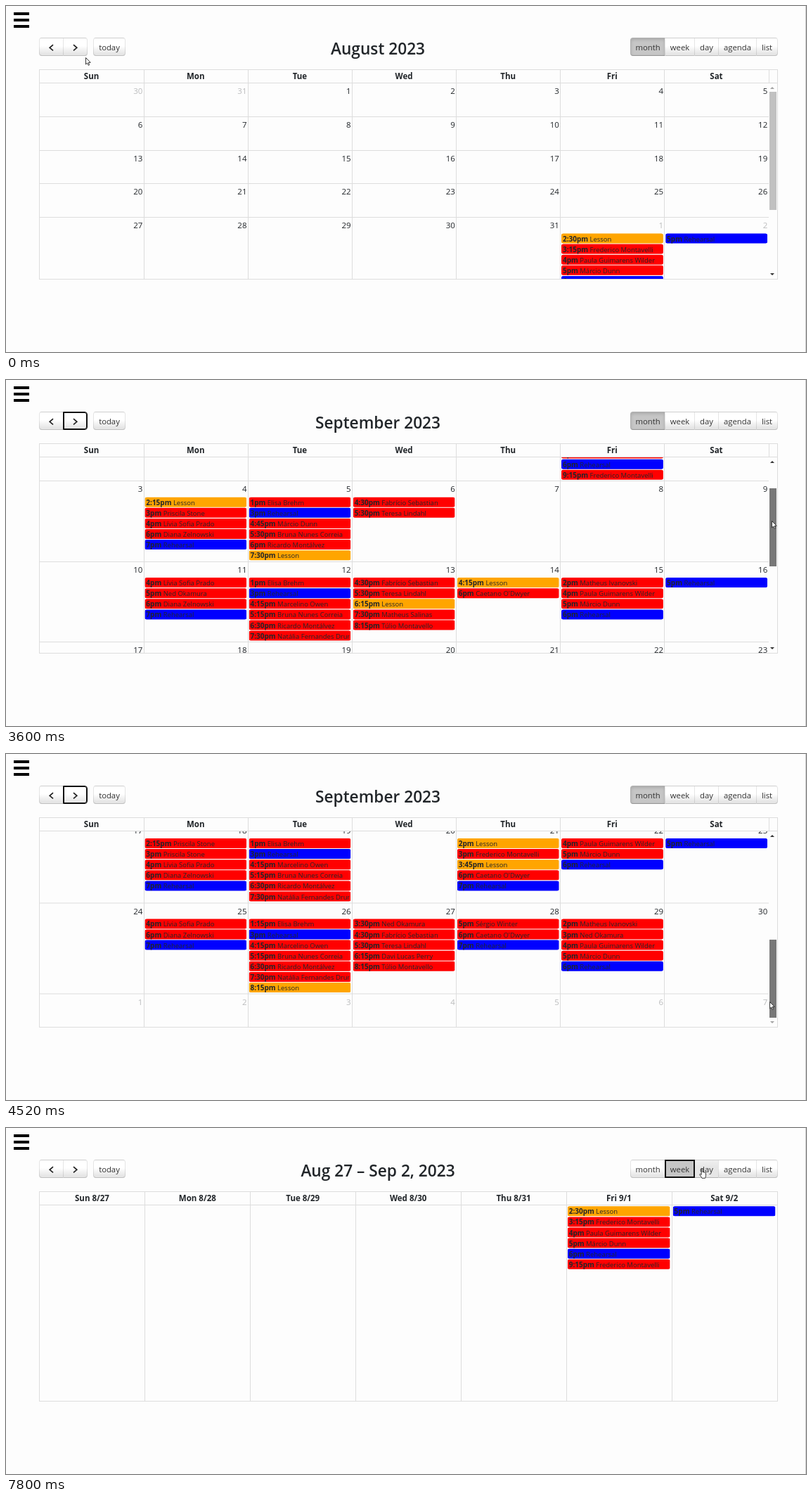
Recreate the animation shown at these times as an HTML page. Size 1138 px wide and 492 px high, loop 8000 ms.

```html
<!DOCTYPE html>
<html lang="en">
<head>
<meta charset="utf-8">
<title>Lesson calendar</title>
<style>
html, body { margin: 0; width: 100%; height: 100%; overflow: hidden; background: #fdfdfd; }
body { font: 11.5px "Open Sans", "Noto Sans", sans-serif; color: #212529; }
#stage { position: relative; width: 1138px; height: 492px; overflow: hidden; background: #fdfdfd; }
#stage div, #stage svg { position: absolute; box-sizing: border-box; white-space: nowrap; }
.bar { background: #000; }
.edge { background: #ccc; }
.line { background: #ddd; }
.frame { border: 1px solid #ddd; }
.title { font-size: 22.7px; font-weight: 600; text-align: center; line-height: 32px; }
.head { font-weight: 700; text-align: center; line-height: 18px; }
.num { text-align: right; line-height: 16px; }
.num.out { opacity: .3; }
.event { border: solid; border-width: 0 2px; border-radius: 2.5px; overflow: hidden;
  font-size: 9.5px; line-height: 15px; }
.event b { font-size: 10px; }
.event.lesson { background: orange; border-color: orange; }
.event.rehearsal { background: #00f; border-color: #00f; }
.event.pupil { background: #f00; border-color: #f00; }
.button { border: 1px solid rgba(0,0,0,.1); border-bottom-color: rgba(0,0,0,.25);
  background: #f5f5f5 linear-gradient(#fff 45%, #e6e6e6 90%);
  font-size: 11.3px; color: #333; text-align: center; line-height: 25px; }
.button.hover { background: linear-gradient(#efefef, #e6e6e6 40%); }
.button.down { background: #c6c6c6; box-shadow: inset 0 2px 4px rgba(0,0,0,.15); }
.button.focus { border-color: #101010; box-shadow: inset 0 0 0 1px #101010; border-radius: 3px; z-index: 1; }
.tip { border: solid transparent; border-width: 0 3px; }
.clip { overflow: hidden; }
</style>
</head>
<body>
<div id="stage"></div>
<script>
const stage = document.getElementById('stage');
const LOOP = 8000, LEFT = 47.5, TOP = 109, BOTTOM = 388;
const DAYS = ['Sun', 'Mon', 'Tue', 'Wed', 'Thu', 'Fri', 'Sat'];

const PEOPLE = {
  A: 'Frederico Montavelli', B: 'Paula Guimarens Wilder', C: 'Márcio Dunn', D: 'Diana Zelnowski',
  E: 'Ricardo Montálvez', F: 'Sérgio Winter', G: 'Priscila Stone', H: 'Fabrício Sebastian',
  I: 'Teresa Lindahl', J: 'Davi Lucas Perry', K: 'Elisa Brehm', L: 'Lesson', M: 'Lívia Sofia Prado',
  N: 'Natália Fernandes Drumond', O: 'Caetano O\'Dwyer', P: 'Matheus Ivanovski', R: 'Rehearsal',
  S: 'Ned Okamura', T: 'Túlio Montavello', U: 'Bruna Nunes Correia', V: 'Marcelino Owen',
  W: 'Matheus Salinas'
};

// September bookings by day: start time followed by a key of PEOPLE
const BOOKINGS = {
  1: '2:30L 3:15A 4B 5C 6R 9:15A', 2: '5R',
  4: '2:15L 3G 4M 6D 7R', 5: '1K 3R 4:45C 5:30U 6E 7:30L', 6: '4:30H 5:30I',
  11: '4M 5S 6D 7R', 12: '1K 3R 4:15V 5:15U 6:30E 7:30N', 13: '4:30H 5:30I 6:15L 7:30W 8:15T',
  14: '4:15L 6O', 15: '2P 4B 5C 6R', 16: '5R',
  18: '2:15G 3G 4M 6D 7R', 19: '1K 3R 4:15V 5:15U 6:30E 7:30N',
  21: '2L 3A 3:45L 6O 7R', 22: '4B 5C 6R', 23: '5R',
  25: '4M 6D 7R', 26: '1:15K 3R 4:15V 5:15U 6:30E 7:30N 8:15L', 27: '3:30S 4:30H 5:30I 6:15J 8:15T',
  28: '5F 6O 7R', 29: '2P 3S 4B 5C 6R'
};
const bookings = day => BOOKINGS[day] ? BOOKINGS[day].split(' ') : [];

function box(parent, cls, x, y, w, h, html = '') {
  const el = document.createElement('div');
  el.className = cls;
  el.style.cssText = `left:${x}px;top:${y}px;width:${w}px;height:${h}px`;
  el.innerHTML = html;
  parent.append(el);
  return el;
}

const icon = (w, h, path, style) =>
  `<svg width="${w}" height="${h}" style="${style}"><path d="${path}"/></svg>`;

function addEvents(parent, day, x, y, w) {
  bookings(day).forEach((entry, i) => {
    const key = entry.slice(-1);
    const kind = { L: 'lesson', R: 'rehearsal' }[key] || 'pupil';
    const event = box(parent, 'event ' + kind, 0, 0, w - 3.5, 14,
      `<b>${entry.slice(0, -1)}pm</b> ${PEOPLE[key]}`);
    // A transform keeps fractional positions
    event.style.transform = `translate(${x + 1.7}px,${y + i * 15.1}px)`;
  });
}

function view(title, labels, colWidth) {
  const root = box(stage, '', 0, 0, 1138, 492);
  box(root, 'title', 329, 45, 400, 32, title);
  labels.forEach((label, i) => {
    const x = LEFT + i * colWidth;
    box(root, 'head', x, 91, colWidth, 18, label);
    if (i) box(root, 'line', Math.round(x), 91, 1, 18);
  });
  box(root, 'line', 48, TOP, 1049, 1);
  return root;
}

// lead: days shown before the 1st; shift: subtracted from a day to get its September date
function month(title, lead, length, shift) {
  const col = 148.15;
  const root = view(title, DAYS, col);
  box(root, 'line', 1085, 91, 1, 18);
  const clip = box(root, 'clip', 0, TOP + 1, 1085, BOTTOM - TOP - 1);
  const sheet = box(clip, '', 0, -1, 1085, 700);
  let y = 0;
  for (let row = 0; row < 6; row++) {
    let most = 0;
    if (row) box(sheet, 'line', 48, Math.round(y), 1037, 1);
    for (let c = 0; c < 7; c++) {
      const day = row * 7 + c - lead + 1, x = LEFT + c * col;
      const out = day < 1 || day > length;
      const shown = day < 1 ? day + 31 : out ? day - length : day;
      box(sheet, out ? 'num out' : 'num', x, Math.round(y + 4), col - 1.3, 16, shown);
      addEvents(sheet, day - shift, x, y + 23.3, col);
      most = Math.max(most, bookings(day - shift).length);
    }
    y += Math.max(47.8, 23.8 + 15.1 * most);
  }
  for (let c = 1; c < 7; c++) box(sheet, 'line', Math.round(LEFT + c * col), 0, 1, y);
  return { root, sheet };
}

function week() {
  const col = 149.9;
  const labels = DAYS.map((d, i) => `${d} ${i < 5 ? '8/' + (27 + i) : '9/' + (i - 4)}`);
  const root = view('Aug 27 – Sep 2, 2023', labels, col);
  for (let i = 1; i < 7; i++) {
    const x = LEFT + i * col;
    box(root, 'line', Math.round(x), TOP, 1, BOTTOM - TOP);
    if (i > 4) addEvents(root, i - 4, x, 111.3, col);
  }
  return { root };
}

// Page furniture
for (const y of [9, 18, 27]) box(stage, 'bar', 11, y, 22, 4);
box(stage, 'edge', 1137, 0, 1, 492);
box(stage, 'frame', 47, 90, 1051, 299);

const chevron = (left, path) =>
  icon(9, 11, path, `left:${left}px;top:8px;fill:none;stroke:#222;stroke-width:1.7`);
const buttons = {};
[
  ['prev', 47, 35, '4px 0 0 4px', chevron(11.5, 'M7 1.2L2.2 5.3L7 9.4')],
  ['next', 81, 35, '0 4px 4px 0', chevron(12, 'M2 1.2L6.8 5.3L2 9.4')],
  ['today', 124, 46, '4px'],
  ['month', 888, 50, '4px 0 0 4px'],
  ['week', 937, 43, '0'],
  ['day', 979, 35, '0'],
  ['agenda', 1013, 55, '0'],
  ['list', 1067, 31, '0 4px 4px 0']
].forEach(([name, x, w, radius, label = name]) => {
  buttons[name] = box(stage, 'button', x, 45, w, 26, label);
  buttons[name].style.borderRadius = radius;
});

const views = {
  august: month('August 2023', 2, 31, 31),
  september: month('September 2023', 5, 30, 0),
  week: week()
};

const scroller = box(stage, '', 1085, TOP + 1, 12, BOTTOM - TOP - 1);
const trough = box(scroller, '', 0, 32, 11, 236);
trough.style.background = '#f1f1f1';
const thumb = box(scroller, '', 1, 0, 10, 0);
const upTip = box(scroller, 'tip', 2, 5, 6, 3);
const downTip = box(scroller, 'tip', 2, 270, 6, 3);

const cursorStyle = 'left:0;top:0;overflow:visible;fill:#fff;stroke:#222;stroke-width:.9;stroke-linejoin:round';
const cursor = box(stage, '', 0, 0, 12, 16,
  icon(9, 13, 'M.5 .5V10L2.7 8L4.2 11.4L5.7 10.7L4.2 7.4H7.2Z', cursorStyle) +
  icon(11, 16, 'M3.2 8.8V1.6q0-1 .9-1t.9 1V5.6q1.2-.5 1.6.4q1-.3 1.5.5q1.4-.2 1.4 1.2V10.5q0 2-1 3.8H4q-.8-1.6-3-4.6q-.6-1 .3-1.3q.8-.2 1.9 1.2z', cursorStyle));
cursor.style.zIndex = 2;
const [arrow, hand] = cursor.children;

// Each step changes only the listed parts of the state
const STEPS = [
  [0, { x: 113, y: 73, hand: 0, view: 'august', active: 'month', scroll: 0, thumb: '#c1c1c1' }],
  [270, { x: 107, y: 67, hand: 1, hover: 'next' }],
  [390, { x: 106, y: 62 }],
  [520, { x: 106, y: 58 }],
  [660, { x: 105, y: 57 }],
  [1750, { down: 'next', focus: 'next' }],
  [1870, { down: '', view: 'september' }],
  [2420, { x: 230, y: 90, hand: 0, hover: '' }],
  [2540, { x: 490, y: 132 }],
  [2660, { x: 736, y: 151 }],
  [2810, { x: 870, y: 120 }],
  [2930, { x: 1010, y: 91 }],
  [3050, { x: 1093, y: 158, thumb: '#a8a8a8' }],
  [3200, { y: 159 }],
  [3460, { x: 1090, y: 178, scroll: 30, thumb: '#787878' }],
  [3600, { x: 1089, y: 200, scroll: 80 }],
  [3720, { x: 1087, y: 222, scroll: 128 }],
  [3850, { x: 1085, y: 244, scroll: 176.5 }],
  [3990, { x: 1084, y: 265, scroll: 238 }],
  [4120, { x: 1082, y: 286, scroll: 301.5 }],
  [4260, { x: 1083, y: 310, scroll: 340 }],
  [4380, { x: 1085, y: 332, scroll: 355.5 }],
  [4520, { x: 1086, y: 352 }],
  [4650, { x: 1087, y: 367 }],
  [4800, { y: 369 }],
  [5230, { x: 1086, y: 363, thumb: '#a8a8a8' }],
  [5380, { x: 1001, y: 142, thumb: '#c1c1c1', trough: 1 }],
  [5520, { x: 960, y: 88 }],
  [5650, { x: 943, y: 67, hand: 1, hover: 'week' }],
  [6440, { down: 'week', focus: 'week' }],
  [6590, { down: '', view: 'week', active: 'week' }],
  [7650, { x: 980, y: 61, hover: '' }],
  [7800, { x: 986, y: 57, hover: 'day' }]
];
let merged = {};
const states = STEPS.map(([time, change]) => ({ time, ...(merged = { ...merged, ...change }) }));

function show(s) {
  for (const name in views) views[name].root.style.display = name === s.view ? '' : 'none';
  for (const name in buttons) {
    const list = buttons[name].classList;
    list.toggle('hover', name === s.hover);
    list.toggle('down', name === s.down || name === s.active);
    list.toggle('focus', name === s.focus);
  }
  views.september.sheet.style.transform = `translateY(${-s.scroll}px)`;
  scroller.style.display = s.view === 'week' ? 'none' : '';
  trough.style.display = s.trough ? '' : 'none';
  thumb.style.top = 12 + s.scroll * .399 + 'px';
  thumb.style.height = (s.view === 'august' ? 168 : 111.5) + 'px';
  thumb.style.background = s.thumb;
  upTip.style.borderBottom = '3px solid ' + (s.scroll ? '#333' : '#a3a3a3');
  downTip.style.borderTop = '3px solid ' + (s.scroll > 355 ? '#a3a3a3' : '#333');
  cursor.style.transform = `translate(${s.x}px,${s.y}px)`;
  arrow.style.display = s.hand ? 'none' : '';
  hand.style.display = s.hand ? '' : 'none';
}

const start = performance.now();
let current;
function tick() {
  const time = (performance.now() - start) % LOOP;
  const state = states.filter(s => s.time <= time).pop();
  if (state !== current) show(current = state);
  requestAnimationFrame(tick);
}
tick();
</script>
</body>
</html>
```
